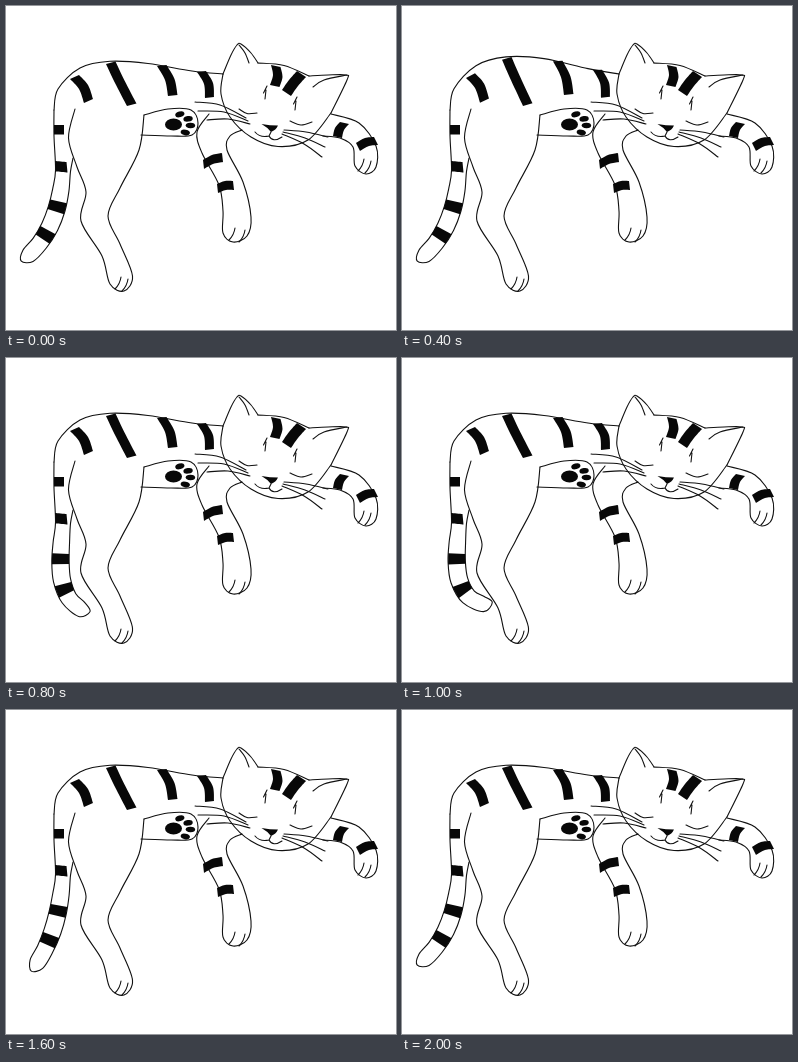
Animation of 390 by 324 pixels, one loop 2170 ms. Source, as an HTML page:

```html
<!DOCTYPE html>
<html lang="en">
<head>
<meta charset="utf-8">
<title>Sleeping cat</title>
<style>
html, body { margin: 0; width: 100%; height: 100%; overflow: hidden; background: #fff; }
svg { display: block; width: 390px; height: 324px; }
.line { fill: none; stroke: #111; stroke-width: 1.1; stroke-linecap: round; stroke-linejoin: round; }
.ink { fill: #080808; }
</style>
</head>
<body>
<svg viewBox="0 0 390 324">
  <g id="torso"></g>
  <g id="tail"></g>
  <g id="limbs"></g>
  <g id="head"></g>
</svg>
<script>
const STEP = 200, LOOP = 2170, RAD = Math.PI / 180;
const put = (id, ...parts) => document.getElementById(id).innerHTML = parts.flat().join('');
const parse = text => text.split(' ').map(p => p.split(',').map(Number));
const still = p => p;

// Smooth curve through a few points
function curve(pts, start = 'M') {
  let d = start + pts[0];
  for (let i = 0; i < pts.length - 1; i++) {
    const b = pts[i], c = pts[i + 1], a = pts[i - 1] || b, e = pts[i + 2] || c;
    const h1 = b.map((v, k) => (v + (c[k] - a[k]) / 6).toFixed(2));
    const h2 = c.map((v, k) => (v - (e[k] - b[k]) / 6).toFixed(2));
    d += `C${h1} ${h2} ${c}`;
  }
  return d;
}

const draw = (cls, d) => `<path class="${cls}" d="${d}"/>`;
const line = (text, move = still) => draw('line', curve(parse(text).map(move)));

// One edge of a stripe, swept sideways by (dx, dy)
function stripe(text, dx, dy, move = still) {
  const edge = parse(text);
  const far = edge.map(([x, y]) => [x + dx, y + dy]).reverse();
  return draw('ink', curve(edge.map(move)) + curve(far.map(move), 'L') + 'Z');
}

// Two parallel lines between the toes of a paw
const toes = (x, y, gap) => [0, 1].map(i =>
  draw('line', `M${x + gap * i},${y + 2 * i}q-1,7 -6,12`));

function pawPads(cx, cy) {
  const pad = (x, y, rx, ry, turn) =>
    `<ellipse class="ink" rx="${rx}" ry="${ry}" transform="translate(${x} ${y}) rotate(${turn})"/>`;
  const small = [-68, -31, 5, 46].map(a =>
    pad(cx + 17 * Math.cos(a * RAD), cy + 11 * Math.sin(a * RAD), 4.7, 2.8, a / 4));
  return [pad(cx, cy, 8.5, 6, 0), small];
}

function whiskers() {
  return [0, 1, 2].map(i => [
    line(`${189 + 3 * i * i},${96 + 9 * i} ${214 + 4 * i},${99 + 7 * i} ${240 + 2 * i},${112 + 3 * i}`),
    line(`${278 - i},${124 + 2 * i} ${300 - i},${126 + 6 * i} ${322 - 3 * i},${131 + 10 * i}`)
  ]).flat();
}

put('limbs',
  line('325,108 353,117 370,140 370,161 360,168 349,160 347,141 334,132 317,130'),
  line('203,108 191,126 196,147 213,179 217,205 217,227 227,236 241,230 245,211 237,176 221,144 224,130 236,124'),
  line('138,109 162,103 185,104 192,117 186,129 165,130 135,129'),
  line('69,103 62.5,132 71,161 80,186 75,215 96,250 104,278 118,285 126.5,270 114,238 102,210 114,182 133,144 138,109'),
  stripe('334,116 329,122 327,130', 9, 2),
  stripe('350,137 359,132 368,131', 4, 8),
  stripe('197,154 206,149 216,147', 1, 9),
  stripe('211,178 219,175 227,175', 1, 9),
  toes(115, 271, 7), toes(229, 222, 10), toes(358, 153, 7),
  pawPads(167.5, 118.5));

put('head',
  line('217,68 215,88 224,111 245,131 272,140.5 302,134 325,107'),
  line('217,68 225,49 231,39 235,38 245,47 252,57'),
  line('252,57 278,59.5 303,70'),
  line('303,70 322,69 340,69 341,74 325,107'),
  line('233,39 239,47 243,57'),
  line('307,81 318,74 341,69'),
  line('233,103 241,107.5 251,107'),
  line('284,115 295,119 306,116'),
  [[261, 80], [291, 91]].map(([x, y]) => draw('line', `M${x},${y}l-3.500,7M${x - 1},${y + 4}l-1,9`)),
  draw('line', 'M265,126L263,130Q254,132 249,126M263,130Q267,137 276,131'),
  draw('ink', 'M255.500,118Q264,119.500 272,119.500Q270,124 265,126Q261,121 255.500,118Z'),
  stripe('265,59 267,69 264,79', 9.5, 2),
  stripe('291,65 283,74 276,84', 9, 6),
  whiskers());

// The back rises with the breath, most in the middle
function drawTorso(breath) {
  const lift = ([x, y]) => {
    const along = Math.sin(Math.PI * Math.min(1, Math.max(0, (x - 46) / 171)));
    const high = Math.min(1, Math.max(0, (100 - y) / 40));
    return [x, +(y - 5 * breath * along * high).toFixed(2)];
  };
  put('torso',
    line('48,104 52,83 74,62 104,55.3 142,57.5 186,65 217,68', lift),
    stripe('64,73 73,83 78,97', 9, -4, lift),
    stripe('100,58 109,77 121,100', 9.5, -2.5, lift),
    stripe('151,60 159,74 162,90', 9.5, -1, lift),
    stripe('191,66 198,78 199,92', 9, -1, lift));
}

// Point on the tail: u runs from hip to tip, side from -1 (inner) to 1 (outer)
function tailPoint(swing, u, side) {
  const length = 96, slices = 40, power = swing > 0 ? 1.5 : 3;
  const heading = v => (5 + swing * v ** power) * RAD;
  let x = 57, y = 165;
  for (let i = 0; i < slices; i++) {
    const h = heading(u * (i + 0.5) / slices);
    x -= Math.sin(h) * length * u / slices;
    y += Math.cos(h) * length * u / slices;
  }
  const half = side * (7.5 + 1.2 * Math.sin(Math.PI * u)), h = heading(u);
  return [x - half * Math.cos(h), y - half * Math.sin(h)].map(v => +v.toFixed(2));
}

function drawTail(swing) {
  const at = (u, side) => tailPoint(swing, u, side);
  const grid = [0, 0.2, 0.4, 0.6, 0.8, 0.98];
  const outline = [[48, 104], [48, 130], ...grid.map(u => at(u, 1)), at(1.07, 0),
    ...grid.reverse().map(u => at(u, -1)), [67, 152]];
  const rings = [0.32, 0.64].map(u =>
    draw('ink', `M${at(u, 1)}L${at(u, -1)}L${at(u + 0.11, -1)}L${at(u + 0.11, 1)}Z`));
  put('tail', draw('line', curve(outline)), rings,
    stripe('48,119 58,119', 0, 9.5), stripe('49,155 60.5,156', 1, 10.5));
}

// Tail swing in degrees for each step
const swings = [45, 45, 45, 0, -75, -98, -75, 0, 30, 45, 45];

let shown = -1;
const begin = performance.now();
function tick() {
  const step = Math.floor((performance.now() - begin) % LOOP / STEP);
  if (step !== shown) {
    shown = step;
    drawTail(swings[step]);
    drawTorso(Math.exp(-1.5 * (step - 2) ** 2));
  }
  requestAnimationFrame(tick);
}
tick();
</script>
</body>
</html>
```
